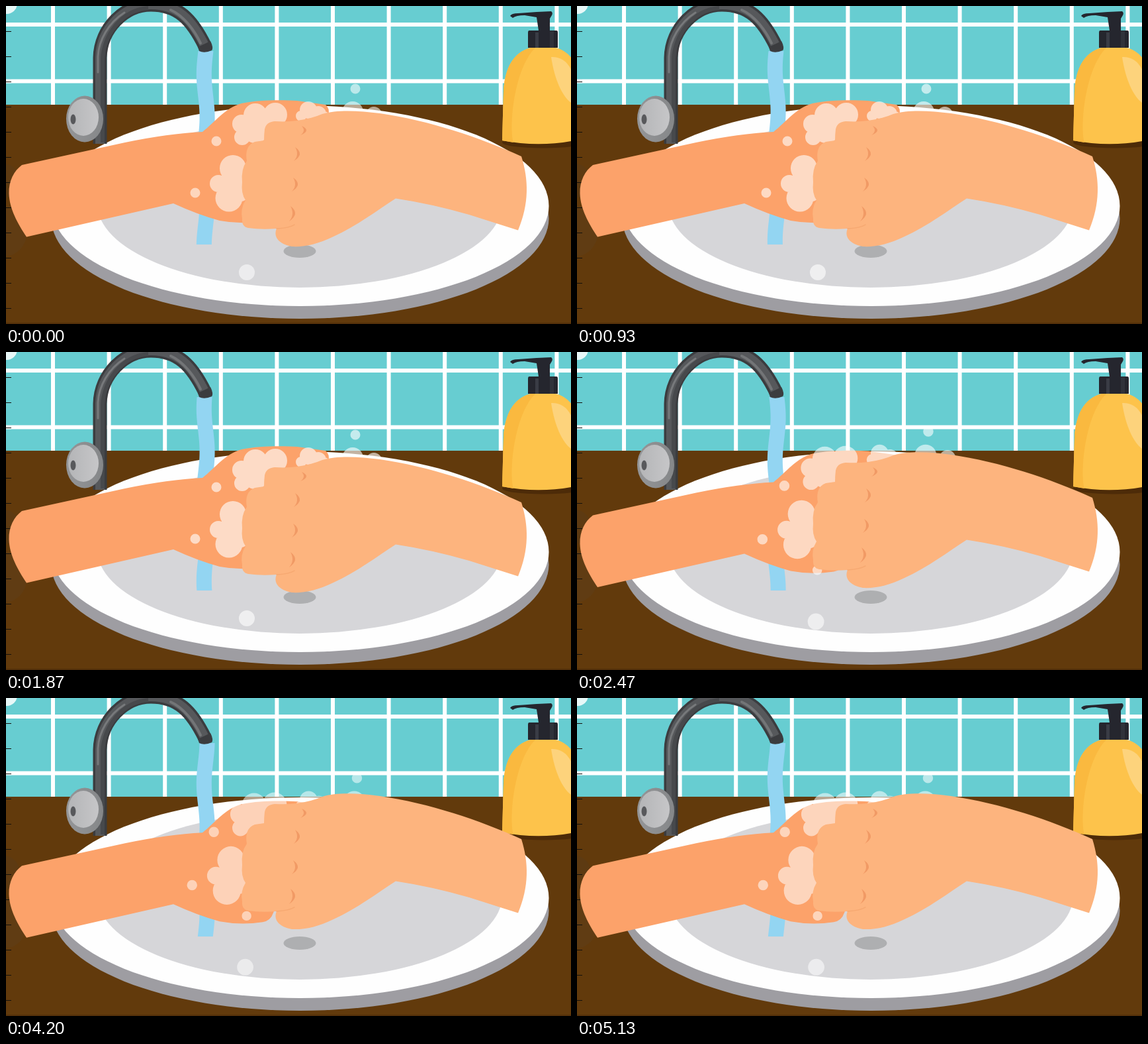
Write an HTML page with a canvas that moves like this. It is 854 px wide and 480 px high and loops after 5190 ms.

```html
<!DOCTYPE html>
<html lang="en">
<head>
<meta charset="utf-8">
<title>Washing hands</title>
<style>
  html, body { margin: 0; width: 100%; height: 100%; overflow: hidden; background: #623a0c; }
  canvas { display: block; width: 854px; height: 480px; }
</style>
</head>
<body>
<canvas id="stage" width="854" height="480"></canvas>
<script>
const ctx = document.getElementById('stage').getContext('2d');
const TAU = Math.PI * 2;
const LOOP = 5190;
const STEP = 1000 / 15;
const RUB = 14 * STEP;

const wave = (t, period, peak) => Math.cos(TAU * (t - peak) / period);

function shape(d, fill) {
  ctx.fillStyle = fill;
  ctx.fill(new Path2D(d));
}

function line(d, color, width, cap = 'butt') {
  ctx.strokeStyle = color;
  ctx.lineWidth = width;
  ctx.lineCap = cap;
  ctx.stroke(new Path2D(d));
}

function oval(x, y, rx, ry, fill) {
  ctx.fillStyle = fill;
  ctx.beginPath();
  ctx.ellipse(x, y, rx, ry, 0, 0, TAU);
  ctx.fill();
}

function rect(x, y, w, h, fill) {
  ctx.fillStyle = fill;
  ctx.fillRect(x, y, w, h);
}

function blend(x0, x1, ...colors) {
  const g = ctx.createLinearGradient(x0, 0, x1, 0);
  colors.forEach((c, i) => g.addColorStop(i / (colors.length - 1), c));
  return g;
}

function drawRoom() {
  rect(0, 0, 854, 150, '#67cdd1');
  for (let i = 0; i < 10; i++) rect(68 + i * 84.6, 0, 6, 150, '#fff');
  rect(0, 25, 854, 6, '#fff');
  rect(0, 110.5, 854, 6, '#fff');
  rect(0, 149, 854, 331, '#623a0c');
  rect(0, 478, 854, 2, '#53300a');
  oval(-3, 264, 24, 26, 'rgba(75, 60, 40, 0.2)');
  oval(-2, 340, 34, 38, 'rgba(90, 70, 45, 0.2)');
  oval(1, -4, 16, 16, 'rgba(255, 255, 255, 0.85)');
  for (let y = 38; y < 480; y += 38) rect(0, y, 8, 1, '#14110c');
}

function drawSink() {
  oval(444.5, 320.5, 376, 151.5, '#9e9da2');
  oval(444.5, 301.5, 376, 151.5, '#fefefe');
  oval(444, 298.5, 306, 126.5, '#d6d6d9');
  oval(444, 370, 24.5, 10, '#aeafb1');
}

function drawFaucet() {
  const neck = 'M142 208 V78 C143 33 180 -2 219 -2 C260 -2 281 20 301 61';
  line(neck, '#3b3c3f', 21);
  line(neck, '#56585b', 14);
  line('M146 206 V80 C147 47 173 6 215 3', '#47494c', 6);
  line('M139 100 V76 C140 52 155 25 179 10', '#77797b', 3, 'round');
  line('M249 6 C269 15 285 37 294 56', '#737577', 4, 'round');
  shape('M290 62 L309 53 Q314 63 311 67 Q300 72 292 68 Z', '#3b3c3f');
  oval(119, 170.5, 28, 35, blend(92, 147, '#949597', '#858789'));
  oval(117, 168, 23, 28, blend(94, 140, '#b4b5b7', '#c6c6c8'));
  oval(101.5, 171, 4, 7.5, '#58595c');
}

function drawBottle() {
  oval(812, 206, 62, 8.5, '#4d2b08');
  shape('M793 63 H831 C858 70 869 97 870 130 L873 200 Q812 215 750 203 L752 128 C754 95 766 70 793 63 Z', '#fdc34b');
  shape('M793 63 C766 70 754 95 752 128 L750 203 L767 206 C760 180 768 95 800 63 Z', '#fab93f');
  shape('M824 77 C842 76 854 88 860 112 L862 150 C846 146 830 118 824 77 Z', '#fdd37c');
  shape('M791 37 H832 Q834 37 834 40 V63 H789 V40 Q789 37 791 37 Z', '#25262e');
  rect(800, 40, 5, 23, '#3a3c45');
  rect(822, 38, 6, 25, '#30323a');
  shape('M802 9 L824 8 Q827 10 825 14 L822 19 V37 H805 L802 17 L784 14 Q771 14 766 18 L762 15 Q764 11 774 11 Z', '#25262e');
}

function drawWater(t) {
  const left = y => 290.2 - 2.4 * Math.cos(TAU * (y - 103 - t * 0.13) / 130);
  ctx.beginPath();
  for (let y = 68; y <= 360; y += 4) ctx.lineTo(left(y), y);
  for (let y = 360; y >= 68; y -= 4) ctx.lineTo(left(y) + 23, y);
  ctx.fillStyle = '#93d5f2';
  ctx.fill();
}

function drawLeftHand(dy) {
  ctx.save();
  ctx.translate(0, dy);
  shape(`M24 240 L180 206 Q245 192.5 297 190 C316 175 331 154 356 147
    C385 141 420 142 440 143 L483 149 Q490 155 487 164 L450 200 L404 311
    Q400 323 388 325 Q355 330 323 324 Q290 315 253 298 L31 348.5
    C18 329 5 306 4.5 283 C4 264 12 249 24 240 Z`, '#fca26a');
  ctx.restore();
}

const foam = [
  // upper lather
  [377, 165, 18], [407, 164, 18], [356, 178, 14], [357, 198, 12], [377, 187, 20], [402, 182, 18],
  // lather by the finger tips
  [457, 157, 13], [472, 163, 12], [446, 166, 8], [481, 168, 9],
  // lower lather
  [343, 245, 20], [321, 268, 13], [337, 290, 20.5], [350, 272, 24],
  // loose bubbles
  [318, 204, 7.5], [286, 282, 7.5], [366, 327, 7], [364, 402, 12], [528, 125, 7.5],
  [524, 160, 16], [556, 164, 12]
];

function drawFoam(scale, alpha) {
  ctx.save();
  ctx.translate(445, 263);
  ctx.scale(scale, scale);
  ctx.translate(-445, -263);
  ctx.beginPath();
  for (const [x, y, r] of foam) {
    ctx.moveTo(x + r, y);
    ctx.arc(x, y, r, 0, TAU);
  }
  ctx.fillStyle = `rgba(255, 255, 255, ${alpha})`;
  ctx.fill();
  ctx.restore();
}

function knuckle(x, y, h) {
  shape(`M${x} ${y} Q${x + 15} ${y + h * 0.5} ${x - 2} ${y + h}
    Q${x + 7} ${y + h * 0.55} ${x} ${y} Z`, '#f19a65');
}

function drawRightHand(dy) {
  ctx.save();
  ctx.translate(0, dy);
  shape(`M391 186 Q393 175 406 174 Q426 175 440 173 Q462 170 478 163
    C500 156 535 158 565 162 C640 173 715 198 779 227
    C790 262 791 298 774 338.5 L700 315 Q645 299 589 290.5
    C562 308 530 332 495 348 C470 360 450 364 432 363
    C415 360 403 350 409 336 Q386 338 366 335 Q356 333 357 321
    Q354 306 362 293 Q355 283 357 266 Q355 246 364 234
    Q360 211 376 205 L390 203 Q390 194 391 186 Z`, '#fdb47e');
  knuckle(447, 181, 14);
  knuckle(437, 213, 21);
  knuckle(434, 259, 21);
  knuckle(430, 302, 23);
  line('M409 336 Q428 335 436 330', '#f6a871', 1.5, 'round');
  ctx.restore();
}

function draw(t) {
  const rub = 7 + 9 * wave(t, RUB, 367);
  const swell = 1.015 + 0.021 * wave(t, RUB, 583);
  const alpha = 0.57 + 0.05 * wave(t, LOOP, 1500);
  drawRoom();
  drawSink();
  drawWater(t);
  drawFaucet();
  drawBottle();
  drawLeftHand(rub * 0.94);
  drawFoam(swell, alpha);
  drawRightHand(-rub);
}

function tick() {
  const t = performance.now() % LOOP;
  draw(Math.floor((t + 4) / STEP) * STEP);
  requestAnimationFrame(tick);
}
tick();
</script>
</body>
</html>
```
